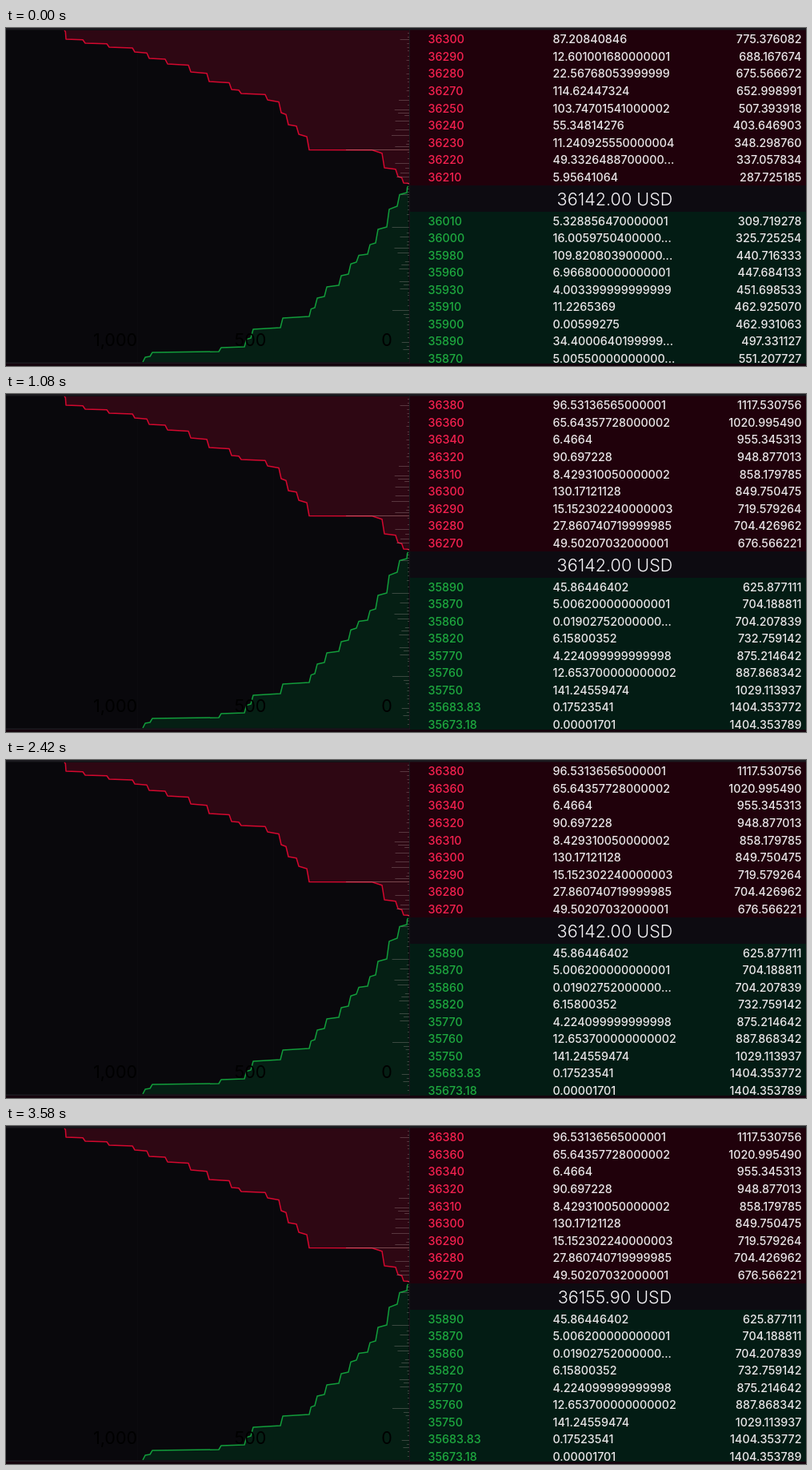
Recreate the animation shown at these times as an HTML page. Size 1000 px wide and 423 px high, loop 3.62 s.

```html
<!DOCTYPE html>
<html lang="en">
<head>
<meta charset="utf-8">
<title>Order book depth</title>
<style>
  html, body { margin: 0; width: 100%; height: 100%; overflow: hidden; background: #09080c; }
  svg { display: block; width: 100vw; height: 100vh; }
  text { font-family: Inter, Roboto, sans-serif; }
  .rows { font-size: 14.3px; font-weight: 500; fill: #e9e6e8; }
  .ask { fill: #f5214f; }
  .bid { fill: #1ea93f; }
  .end { text-anchor: end; }
  .price { font-size: 21.6px; font-weight: 300; fill: #f6f5f8; text-anchor: middle; }
  .axis { font-size: 21.5px; fill: #000; text-anchor: middle; }
  .line { fill: none; stroke-width: 1.5; stroke-linejoin: round; }
  .old, .new { animation: 3620ms step-end infinite; }
  .rows.old { animation-name: rows-out; }
  .rows.new { animation-name: rows-in; }
  .price.old { animation-name: price-out; }
  .price.new { animation-name: price-in; }
  @keyframes rows-out { 0% { opacity: 1 } 25.4%, 100% { opacity: 0 } }
  @keyframes rows-in { 0% { opacity: 0 } 25.4%, 100% { opacity: 1 } }
  @keyframes price-out { 0% { opacity: 1 } 88.1%, 100% { opacity: 0 } }
  @keyframes price-in { 0% { opacity: 0 } 88.1%, 100% { opacity: 1 } }
</style>
</head>
<body>
<svg viewBox="0 0 1000 423" preserveAspectRatio="none">
  <rect width="1000" height="423" fill="#09080c"/>
  <path d="M164.500 3V419M334.500 3V419" stroke="#0c0b0f"/>
  <g id="depth"></g>
  <path id="ticks" stroke="#b9a6a6" stroke-opacity=".3" fill="none"/>
  <path d="M425 152.500H504" stroke="#c38a8a" stroke-opacity=".5"/>
  <g class="axis">
    <text x="136.500" y="398">1,000</text>
    <text x="305.500" y="398">500</text>
    <text x="476" y="398">0</text>
  </g>
  <rect x="505" y="2" width="495" height="195" fill="#20010b"/>
  <rect x="505" y="197" width="495" height="33" fill="#0d0b11"/>
  <rect x="505" y="230" width="495" height="190" fill="#031c14"/>
  <rect x="504" y="2" width="1" height="418" fill="#17151a"/>
  <rect width="1000" height="2.500" fill="#1b1a1f"/>
  <rect y="418.500" width="505" height="1.500" fill="#1d1a20"/>
  <rect y="420" width="1000" height="3" fill="#14040d"/>
  <g id="book"></g>
  <text class="price old" x="761" y="222">36142.00 USD</text>
  <text class="price new" x="761" y="222">36155.90 USD</text>
</svg>
<script>
const byId = id => document.getElementById(id);

// Each step runs sideways almost to the next key point, then drops to it
const stairs = keys => {
  const points = keys.split(' ').map(p => p.split(',').map(Number));
  return points.flatMap(([x, y], i) => {
    if (!i) return [[x, y]];
    const [px, py] = points[i - 1], dx = x - px;
    const slant = Math.sign(dx) * Math.min(3, Math.abs(dx) / 3);
    return [[x - slant, py + (y - py) * .15], [x, y]];
  }).join(' ');
};
const side = (keys, close, fill, stroke) => {
  const line = stairs(keys);
  return `<polygon points="${line} ${close}" fill="${fill}"/>
    <polyline class="line" points="${line}" stroke="${stroke}"/>`;
};
const asks = '73,3 75,14 99,19 129,24 161,30 179,38 202,45 231,55 254,67 282,77 294,82 327,90 ' +
  '344,106 353,121 366,133 379,152.5 460,153.5 473,175 490,186 497,194 504,195';
const bids = '503,198 501,206 489,223 476,249 462,269 452,283 438,293 428,308 416,322 ' +
  '398,336 386,350 379,361 343,375 306,388 298,399 266,405 180,411 171,418';
byId('depth').innerHTML =
  side(asks, '504,3', '#2e0713', '#d5082f') + side(bids, '504,418', '#051f14', '#129d3b');

// Volume bars: mostly short, a few long
let seed = 11;
const random = () => (seed = seed * 16807 % 2147483647) / 2147483647;
let bars = '';
for (let y = 6.5; y < 416; y += 3 + Math.floor(random() * 6)) bars += `M${504 - 2 - 20 * random() ** 5} ${y}H504`;
byId('ticks').setAttribute('d', bars);

const before = `36300 87.20840846 775.376082
36290 12.601001680000001 688.167674
36280 22.56768053999999 675.566672
36270 114.62447324 652.998991
36250 103.74701541000002 507.393918
36240 55.34814276 403.646903
36230 11.240925550000004 348.298760
36220 49.3326488700000... 337.057834
36210 5.95641064 287.725185
36010 5.328856470000001 309.719278
36000 16.0059750400000... 325.725254
35980 109.820803900000... 440.716333
35960 6.966800000000001 447.684133
35930 4.003399999999999 451.698533
35910 11.2265369 462.925070
35900 0.00599275 462.931063
35890 34.4000640199999... 497.331127
35870 5.00550000000000... 551.207727`;
const after = `36380 96.53136565000001 1117.530756
36360 65.64357728000002 1020.995490
36340 6.4664 955.345313
36320 90.697228 948.877013
36310 8.429310050000002 858.179785
36300 130.17121128 849.750475
36290 15.152302240000003 719.579264
36280 27.860740719999985 704.426962
36270 49.50207032000001 676.566221
35890 45.86446402 625.877111
35870 5.006200000000001 704.188811
35860 0.01902752000000... 704.207839
35820 6.15800352 732.759142
35770 4.224099999999998 875.214642
35760 12.653700000000002 887.868342
35750 141.24559474 1029.113937
35683.83 0.17523541 1404.353772
35673.18 0.00001701 1404.353789`;

const row = (line, i) => {
  const [price, size, total] = line.split(' ');
  const y = i < 9 ? 19.4 + i * 21.54 : 246.5 + (i - 9) * 21.56;
  return `<text class="${i < 9 ? 'ask' : 'bid'}" x="527.5" y="${y}">${price}</text>
    <text x="683.5" y="${y}">${size}</text><text class="end" x="994.5" y="${y}">${total}</text>`;
};
const table = (data, name) => `<g class="rows ${name}">${data.split('\n').map(row).join('')}</g>`;
byId('book').innerHTML = table(before, 'old') + table(after, 'new');
</script>
</body>
</html>
```
